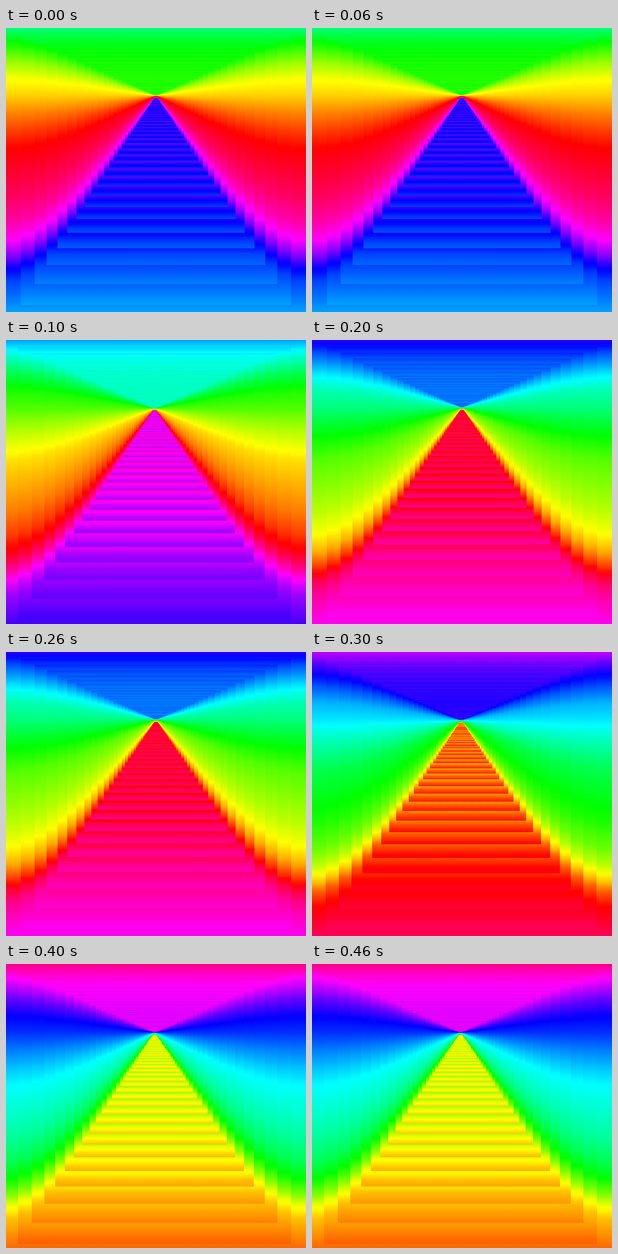
These frames come from a looping animation (524x495 px, 500 ms). An HTML page with a canvas:

```html
<!DOCTYPE html>
<html lang="en">
<head>
<meta charset="utf-8">
<title>Rainbow tunnel</title>
<style>
  html, body { margin: 0; width: 100%; height: 100%; overflow: hidden; background: #000; }
  canvas { display: block; }
</style>
</head>
<body>
<canvas id="stage" width="524" height="495"></canvas>
<script>
const W = 524, H = 495;
const ctx = document.getElementById('stage').getContext('2d');

const STEP = 100;          // ms per pose
const SHRINK = 0.9;        // size of each nested panel relative to the one around it
const LAYERS = 44;
const STOPS = 96;
const HALF = 262, UP = 118, DOWN = 405;

// Hue along the outermost panel: [y, degrees]
const RAMP = [
  [0, 150], [22, 122], [42, 102], [60, 84], [87, 62], [118, 49],
  [150, 30], [180, 14], [210, 0], [260, -13], [300, -24], [340, -40],
  [370, -60], [400, -92], [415, -114], [440, -135], [495, -158], [523, -165]
];

// Vanishing point, scale and hue shift of every pose
const POSES = [
  { x: 262, y: 118, scale: 1, hue: 0 },
  { x: 259.5, y: 119.5, scale: 1.01, hue: 52 },
  { x: 262, y: 118, scale: 1, hue: 100 },
  { x: 260.5, y: 119, scale: 1.005, hue: 136 },
  { x: 259.5, y: 119.5, scale: 1.01, hue: 180 }
];

function rampHue(y) {
  let i = 1;
  while (i < RAMP.length - 1 && RAMP[i][0] < y) i++;
  const [y0, h0] = RAMP[i - 1], [y1, h1] = RAMP[i];
  return h0 + (h1 - h0) * (y - y0) / (y1 - y0);
}

function drawLayer(pose, k) {
  const s = pose.scale * SHRINK ** k;
  const stretch = 0.775 + 0.225 * 0.7 ** k;  // inner panels show less of the ramp
  const top = pose.y - UP * s, bottom = pose.y + DOWN * s;
  const fill = ctx.createLinearGradient(0, top, 0, bottom);
  for (let i = 0; i <= STOPS; i++) {
    const t = i / STOPS;
    const v = t * (UP + DOWN) - UP;
    const hue = (rampHue(UP + v * stretch) + pose.hue + 360) % 360;
    fill.addColorStop(t, `hsl(${hue.toFixed(1)}, 100%, 50%)`);
  }
  ctx.fillStyle = fill;
  if (k === 0) {
    ctx.fillRect(0, 0, W, H);
    return;
  }
  const l = Math.round(pose.x - HALF * s), r = Math.round(pose.x + HALF * s);
  const t = Math.round(top), b = Math.round(bottom);
  ctx.fillRect(l, t, r - l, b - t);
}

let shown = -1;
function draw(ms) {
  const n = Math.floor(ms / STEP) % POSES.length;
  if (n === shown) return;
  shown = n;
  for (let k = 0; k < LAYERS; k++) drawLayer(POSES[n], k);
}

const start = performance.now();
function loop() {
  draw(performance.now() - start);
  requestAnimationFrame(loop);
}
loop();
</script>
</body>
</html>
```
